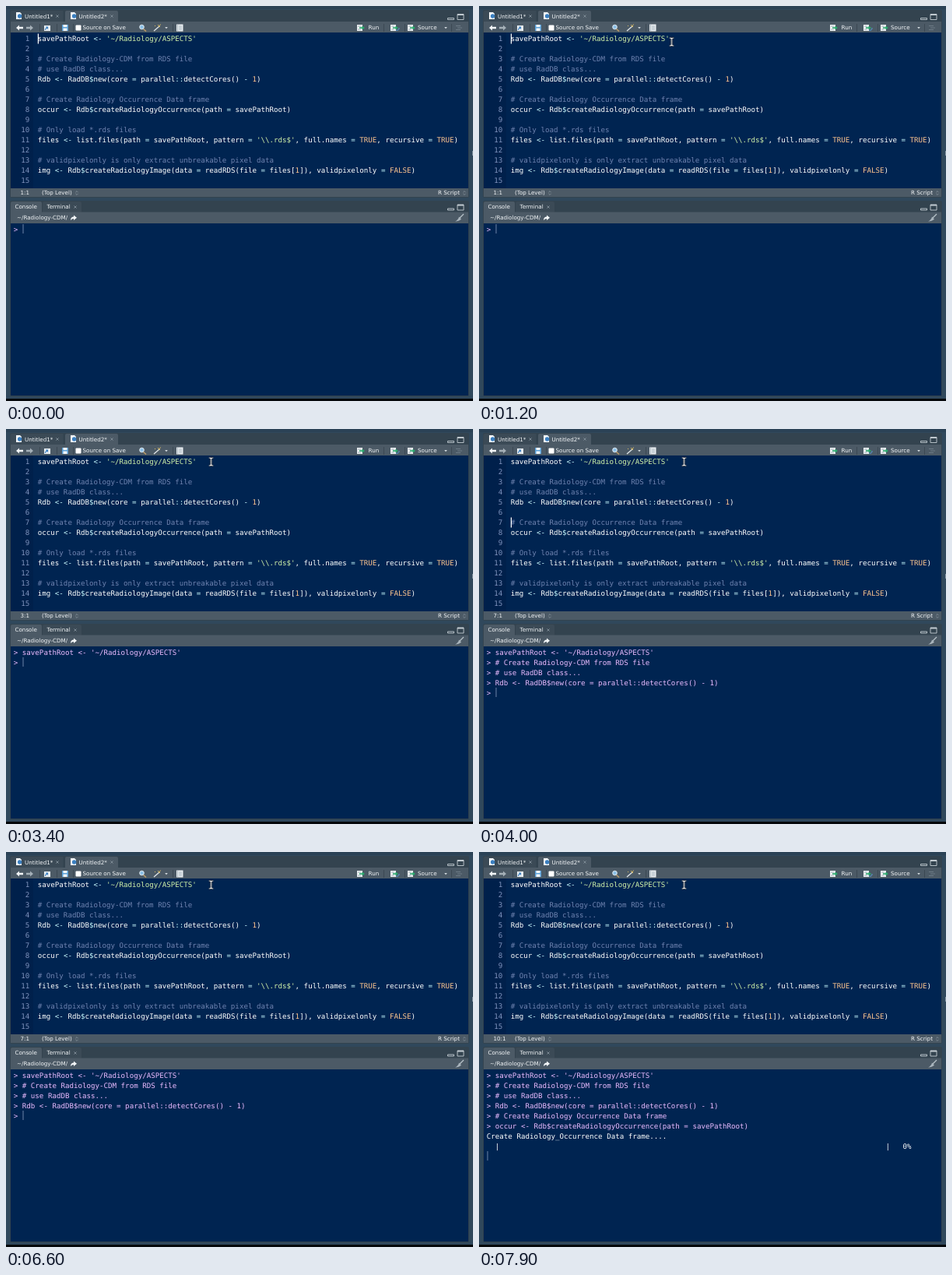
Write an HTML page that moves like this. It is 600x507 px and loops after 8 s.

```html
<!DOCTYPE html>
<html lang="en">
<head>
<meta charset="utf-8">
<title>R session</title>
<style>
  html, body { margin: 0; width: 100%; height: 100%; overflow: hidden; background: #30485c; }
  svg { display: block; width: 600px; height: 507px; }
  text { white-space: pre; text-rendering: geometricPrecision; }
  .ui text { font: 7.15px "DejaVu Sans", sans-serif; fill: #f2f5f7; }
  .ui .dim { fill: #98a4ad; }
  .mono text, text.mono { font: 9.177px "DejaVu Sans Mono", monospace; fill: #fff; }
  .mono .num { fill: #7f92bd; text-anchor: end; }
  .com { fill: #6f83b0; }
  .str { fill: #d1f1a9; }
  .val { fill: #ffc58f; }
  .op { fill: #c8faff; }
  .mono .echo { fill: #ebbbff; }
  .bar { fill: #4c5a66; }
  .strip { fill: #33434f; }
  .sep { stroke: #3b4853; }

  .state { animation: 8s step-end infinite; }
  .s0 { animation-name: s0; }
  .s1 { animation-name: s1; }
  .s2 { animation-name: s2; }
  .s3 { animation-name: s3; }
  .s4 { animation-name: s4; }
  @keyframes s0 { 0% { visibility: visible } 21.25% { visibility: hidden } }
  @keyframes s1 { 0% { visibility: hidden } 21.25% { visibility: visible } 32.5% { visibility: hidden } }
  @keyframes s2 { 0% { visibility: hidden } 32.5% { visibility: visible } 47.5% { visibility: hidden } }
  @keyframes s3 { 0% { visibility: hidden } 47.5% { visibility: visible } 91.25% { visibility: hidden } }
  @keyframes s4 { 0% { visibility: hidden } 91.25% { visibility: visible } }

  .caret { fill: #fff; animation: blink 1s step-end infinite; }
  @keyframes blink { 0% { opacity: 1 } 60% { opacity: 0 } }

  .pointer { animation: move 8s infinite, enter 8s step-end infinite; }
  @keyframes enter { 0% { opacity: 0 } 8.75% { opacity: 1 } }
  @keyframes move {
    0%, 8.75% { transform: translate(296px, 120px); animation-timing-function: ease-out }
    14%, 16.25% { transform: translate(247.5px, 46px); animation-timing-function: ease-in-out }
    20%, 100% { transform: translate(263.5px, 42px) }
  }
</style>
</head>
<body>
<svg viewBox="0 0 600 507">
  <defs>
    <g id="page">
      <path d="M0 0h5l2 2v7H0z" fill="#f4f7f9"/>
      <circle cx="4.6" cy="5" r="2.7" fill="#3b7fc0"/>
    </g>
    <g id="winButtons" fill="none" stroke="#c3ccd2">
      <path d="M567.5 4.5h8v-2h-8z" stroke-width=".9"/>
      <path d="M580 -2.5h8v7h-8z" stroke-width=".9"/>
      <path d="M580 -1.8h8" stroke-width="1.6"/>
    </g>
    <path id="close" d="M-1.6 -1.6l3.2 3.2M1.6 -1.6l-3.2 3.2" stroke="#83919b" stroke-width=".9"/>
    <path id="drop" d="M-1.8 -1h3.6L0 1.2z" fill="#d5dce1"/>
    <path id="updown" d="M-1.6 -.8L0 -2.4 1.6 -.8M-1.6 .8L0 2.4 1.6 .8" fill="none" stroke="#93a0a9" stroke-width=".7"/>
    <g id="run">
      <path d="M0 0h7v8H0z" fill="#edf1f3"/>
      <path d="M1 2h4M1 6h4" stroke="#8fa0ab" stroke-width=".8"/>
      <path d="M3 4h4" stroke="#2aa86c" stroke-width="1.6"/>
      <path d="M6.5 1.5L10 4 6.5 6.5z" fill="#2aa86c"/>
    </g>
  </defs>

  <!-- panes -->
  <rect width="600" height="507" fill="#30485c"/>
  <rect width="600" height="4" fill="#2b4256"/>
  <rect y="504" width="600" height="3" fill="#05080b"/>
  <path d="M599.5 186v6" stroke="#8797a3"/>
  <rect x="5" y="5" width="590" height="241" rx="2" class="strip"/>
  <path d="M5.500 20V8q0-2 2-2h66v14z" fill="#3b4a56"/>
  <path d="M76 20V8q0-2 2-2h64q2 0 2 2v12z" class="bar"/>
  <rect x="6" y="20" width="588" height="14" class="bar"/>
  <rect x="6" y="34" width="588" height="200" fill="#002451"/>
  <rect x="6" y="34" width="29" height="200" fill="#00204b"/>
  <rect x="6" y="234" width="588" height="11" class="bar"/>
  <rect x="5" y="250" width="590" height="251" rx="2" class="strip"/>
  <path d="M6 265V253q0-2 2-2h36q2 0 2 2v12z" class="bar"/>
  <path d="M47 265V253q0-2 2-2h46q2 0 2 2v12z" fill="#3b4a56"/>
  <rect x="6" y="264.500" width="588" height="14.500" class="bar"/>
  <rect x="6" y="279" width="588" height="221" fill="#002451"/>

  <!-- toolbars -->
  <g class="ui">
    <use href="#page" x="13" y="8"/>
    <use href="#page" x="83" y="8"/>
    <text x="24" y="15.500">Untitled1*</text>
    <text x="93.500" y="15.500">Untitled2*</text>
    <use href="#close" x="66" y="13"/>
    <use href="#close" x="136" y="13"/>
    <use href="#winButtons" y="13"/>
    <use href="#winButtons" y="257.500"/>

    <path d="M13 28l4-3.500v2.200h5v2.600h-5v2.200z" fill="#f3f6f8"/>
    <path d="M35 28l-4-3.500v2.200h-5v2.600h5v2.200z" fill="#a5b0b8"/>
    <path class="sep" d="M43.500 23v10M65.500 23v10M86.500 23v10M214.500 23v10M512.500 23v10M572.500 23v10"/>
    <path d="M49 25h8v7h-8z" fill="#e8edf0"/>
    <path d="M50 30.500l3-3M51 27h2.500v2.500" fill="none" stroke="#3b7fc0" stroke-width="1.100"/>
    <path d="M72 24h8v8h-8z" fill="#5aa0d8"/>
    <path d="M73.500 24h5v3h-5zM73.500 28.500h5v3.500h-5z" fill="#f2f6f9"/>
    <rect x="89.500" y="24.500" width="7" height="7" rx="1" fill="#fff"/>
    <text x="98.500" y="30.300">Source on Save</text>
    <path d="M176.500 29.500l3.500 3" stroke="#c2a06a" stroke-width="1.500"/>
    <circle cx="174.500" cy="27" r="2.800" fill="#8dc1e8" stroke="#eef3f6" stroke-width=".9"/>
    <path d="M190 32l7-6" stroke="#dfe5e9" stroke-width="1.300"/>
    <path d="M195 24l3 3M198.500 23.500l-2 3M191 25l1 1" stroke="#e8c767" stroke-width=".9"/>
    <use href="#drop" x="206" y="28"/>
    <rect x="219" y="23.500" width="8.500" height="9" fill="#e9eef1"/>
    <path d="M220.500 23.500v9M222 26h4M222 28h4M222 30h4" stroke="#8b9ba7" stroke-width=".7"/>
    <use href="#run" x="451" y="24"/>
    <text x="465.500" y="30.300">Run</text>
    <path class="sep" d="M485.500 23v10"/>
    <use href="#run" x="494" y="24"/>
    <path d="M501 31q4 1 4-3" fill="none" stroke="#5aa0d8"/>
    <use href="#run" x="516" y="24"/>
    <text x="529" y="30.300">Source</text>
    <use href="#drop" x="565" y="28"/>
    <path d="M578 25.500h6M580 28h6M578 30.500h6" stroke="#6d7b86"/>

    <text x="46" y="242.300">(Top Level)</text>
    <use href="#updown" x="91" y="240"/>
    <text x="555" y="242.300">R Script</text>
    <use href="#updown" x="589" y="240"/>

    <text x="11.500" y="260.300">Console</text>
    <text x="52.500" y="260.300">Terminal</text>
    <use href="#close" x="89" y="258"/>
    <text x="14" y="274.300">~/Radiology-CDM/</text>
    <path d="M83 275q0-4.500 4-4.500v-2l4 3.200-4 3.200v-2q-2.500 0-4 2.100z" fill="#f3f6f8"/>
    <path d="M588 267l-5 5" stroke="#b9c3ca" stroke-width="1.200"/>
    <path d="M582 270.500l3 3q-3 3-8 3 4-2 5-6z" fill="#a9b4bc"/>
  </g>

  <g id="code" class="mono"></g>
  <g id="states"></g>

  <g class="pointer" fill="none">
    <path d="M-2.500 -5Q0 -5 0 -3.500Q0 -5 2.500 -5M0 -4V4M-2.500 5Q0 5 0 3.500Q0 5 2.500 5" stroke="#10151c" stroke-width="2.600"/>
    <path d="M-2.500 -5Q0 -5 0 -3.500Q0 -5 2.500 -5M0 -4V4M-2.500 5Q0 5 0 3.500Q0 5 2.500 5" stroke="#fff" stroke-width="1.200"/>
  </g>
</svg>
<script>
  const CHAR = 5.525, ROW = 13, CODE_X = 40.8, CONSOLE_X = 9.8;

  const code = String.raw`savePathRoot <- '~/Radiology/ASPECTS'

# Create Radiology-CDM from RDS file
# use RadDB class...
Rdb <- RadDB$new(core = parallel::detectCores() - 1)

# Create Radiology Occurrence Data frame
occur <- Rdb$createRadiologyOccurrence(path = savePathRoot)

# Only load *.rds files
files <- list.files(path = savePathRoot, pattern = '\\.rds$', full.names = TRUE, recursive = TRUE)

# validpixelonly is only extract unbreakable pixel data
img <- Rdb$createRadiologyImage(data = readRDS(file = files[1]), validpixelonly = FALSE)
`.split('\n');

  const escape = s => s.replace(/&/g, '&amp;').replace(/</g, '&lt;');
  const text = (x, y, body, cls = '') => `<text x="${x}" y="${y}" class="${cls}">${body}</text>`;

  const token = /(#.*)|('.*?')|(\b(?:TRUE|FALSE|\d+)\b)|(<-|::|[=$-])/g;
  const kinds = ['com', 'str', 'val', 'op'];
  function highlight(line) {
    let out = '', last = 0;
    for (const m of line.matchAll(token)) {
      const kind = kinds[m.slice(1).findIndex(Boolean)];
      out += escape(line.slice(last, m.index)) + `<tspan class="${kind}">${escape(m[0])}</tspan>`;
      last = m.index + m[0].length;
    }
    return out + escape(line.slice(last));
  }

  document.getElementById('code').innerHTML = code.map((line, i) => {
    const y = 45.3 + i * ROW;
    return text(30.3, y, i + 1, 'num') + text(CODE_X, y, highlight(line));
  }).join('');

  const echoed = [0, 2, 3, 4, 6, 7].map(i => '> ' + code[i]);
  const output = [
    'Create Radiology_Occurrence Data frame....',
    '  |' + ' '.repeat(90) + '|   0%'
  ];

  // at: start in ms, line and col: caret, done: echoed rows
  const states = [
    { at: 0, line: 1, col: 1, done: 0 },
    { at: 1700, line: 1, col: 38, done: 0 },
    { at: 2600, line: 3, col: 1, done: 1 },
    { at: 3800, line: 7, col: 1, done: 4 },
    { at: 7300, line: 10, col: 1, done: 6, busy: true }
  ];

  function consoleRows({ done, busy }) {
    const rows = echoed.slice(0, done).map(s => [s, 'echo']);
    if (busy) rows.push(...output.map(s => [s, '']));
    const top = 280 + rows.length * ROW;
    if (!busy) rows.push(['>', 'echo']);
    return rows.map(([s, cls], i) => text(CONSOLE_X, 290.2 + i * ROW, escape(s), cls)).join('') +
      `<rect x="${busy ? 10.5 : 21.5}" y="${top}" width="1" height="12" fill="#6d82a8"/>`;
  }

  document.getElementById('states').innerHTML = states.map((s, i) => {
    const x = CODE_X + (s.col - 1) * CHAR;
    const y = 35.5 + (s.line - 1) * ROW;
    const delay = s.at % 1000 - 1000;
    return `<g class="state s${i}">
      <g class="ui">${text(18.5, 242.3, s.line + ':' + s.col)}</g>
      <g class="mono">${consoleRows(s)}</g>
      <rect class="caret" x="${x}" y="${y}" width="1.2" height="13" style="animation-delay:${delay}ms"/>
    </g>`;
  }).join('');
</script>
</body>
</html>
```
